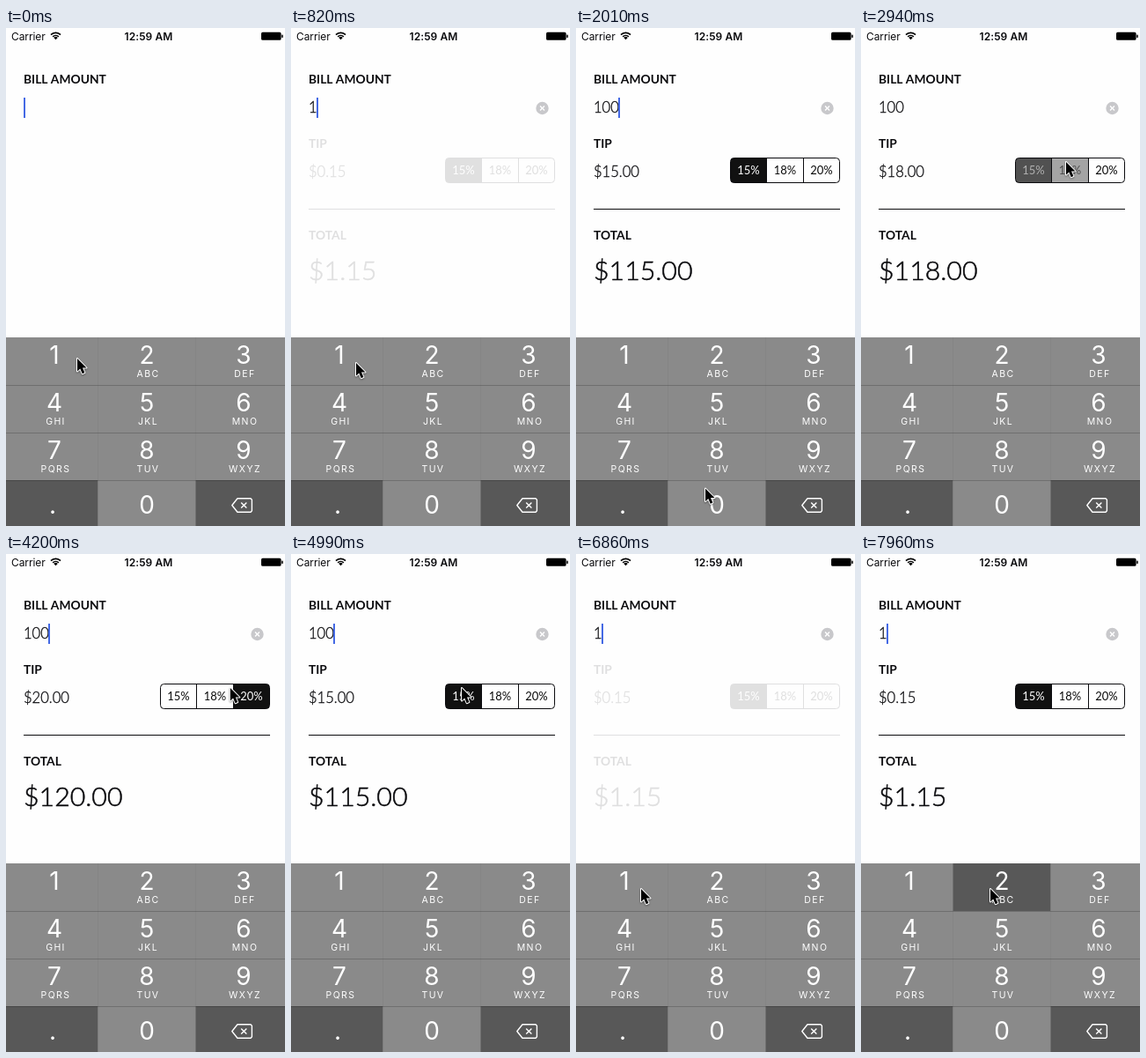
Animation, 317 px wide and 565 px high, one loop 8000 ms. Source, as an HTML page with a canvas:

```html
<!DOCTYPE html>
<html lang="en">
<head>
<meta charset="utf-8">
<title>Tip calculator</title>
<style>
html, body { margin: 0; width: 100%; height: 100%; overflow: hidden; background: #fefefe; }
canvas { display: block; width: 317px; height: 565px; }
</style>
</head>
<body>
<canvas id="stage"></canvas>
<script>
const W = 317, H = 565, LOOP = 8000;
const MOVE = 300, PRESS = 140, CROSSFADE = 300, REVEAL = 550, HIDE = 120;
const PAPER = '#fefefe', INK = '#0b0b0e';
const UI = 'Inter, sans-serif', BODY = 'Lato, sans-serif';

const canvas = document.getElementById('stage');
const ctx = canvas.getContext('2d');
const ratio = window.devicePixelRatio || 1;
canvas.width = W * ratio;
canvas.height = H * ratio;

const digits = '123456789.0'.split('');
const letters = ' ABC DEF GHI JKL MNO PQRS TUV WXYZ'.split(' ');
const percents = [15, 18, 20];
const colEdges = [0, 104.5, 215.5, W];
const colCenters = [55, 160, 270];
const rowTop = row => 351 + 54 * row;
const segX = i => 175.5 + Math.round(41.3 * i);

// Places the pointer can tap
function key(digit) {
  const i = digits.indexOf(digit);
  return { digit, x: 74 + 73 * (i % 3), y: 380 + 47.5 * Math.floor(i / 3) };
}
const segment = i => ({ segment: i, x: 194 + 39 * i, y: 152 });
const clearButton = { clear: true, x: 286, y: 92 };

// The pointer leaves for a target, then lifts off it at `taps`
const home = { x: 81, y: 375 };
const steps = [
  { target: key('1'), leaves: 300, taps: [700] },
  { target: key('0'), leaves: 980, taps: [1780, 1980] },
  { target: segment(1), leaves: 2060, taps: [2860] },
  { target: segment(2), leaves: 3090, taps: [3700] },
  { target: segment(0), leaves: 4110, taps: [4600] },
  { target: clearButton, leaves: 5040, taps: [5870] },
  { target: key('1'), leaves: 6230, taps: [6740] },
  { target: key('0'), leaves: 6940, taps: [] },
  { target: key('2'), leaves: 7600, taps: [8040] }
];
const taps = steps.flatMap(({ target, taps }) => taps.map(at => ({ ...target, at })));

const clamp = v => Math.max(0, Math.min(1, v));
const smooth = v => v * v * (3 - 2 * v);
const mix = (a, b, p) => a + (b - a) * p;
const gray = v => `rgb(${Math.round(v)},${Math.round(v)},${Math.round(v)})`;

// Replays every tap finished by time t
function stateAt(t) {
  const s = { bill: '', amount: 0, editAt: 0, toggleAt: -LOOP, rate: 0, oldRate: 0, rateAt: -LOOP };
  for (const { at, digit, segment, clear } of taps) {
    if (at > t) break;
    if (segment !== undefined) {
      s.oldRate = s.rate;
      s.rate = segment;
      s.rateAt = at;
      continue;
    }
    if (clear || !s.bill) s.toggleAt = at;
    s.bill = clear ? '' : s.bill + digit;
    s.amount = Number(s.bill) || s.amount;
    s.editAt = at;
  }
  s.pressed = taps.find(tap => t >= tap.at - PRESS && t < tap.at) || {};
  return s;
}

function text(str, x, y, font, { align = 'left', color = INK, spacing = 0, outline = 0 } = {}) {
  ctx.font = font;
  ctx.textAlign = align;
  ctx.fillStyle = ctx.strokeStyle = color;
  ctx.letterSpacing = spacing + 'px';
  ctx.fillText(str, x, y);
  if (outline) {
    ctx.lineWidth = outline;
    ctx.strokeText(str, x, y);
  }
  ctx.letterSpacing = '0px';
}

const label = (str, y) => text(str, 20, y, `700 13.8px ${BODY}`);
const value = (str, y, size) =>
  text(str, 20, y, `300 ${size}px ${BODY}`, { outline: size * 0.018 });

function line(points, color, width, close) {
  ctx.beginPath();
  points.forEach(([x, y]) => ctx.lineTo(x, y));
  if (close) ctx.closePath();
  ctx.strokeStyle = color;
  ctx.lineWidth = width;
  ctx.stroke();
}

function cross(x, y, r) {
  line([[x - r, y - r], [x + r, y + r]], '#fff', 1.4);
  line([[x - r, y + r], [x + r, y - r]], '#fff', 1.4);
}

function statusBar() {
  text('Carrier', 6, 13.5, `400 12px ${UI}`, { spacing: -0.1 });
  text('12:59 AM', 162, 13.5, `600 12px ${UI}`, { align: 'center', spacing: 0.1 });
  ctx.strokeStyle = ctx.fillStyle = '#000';
  for (let i = 0; i < 3; i++) {
    ctx.beginPath();
    ctx.arc(56.5, 13.2, 1.6 + 3.1 * i, -Math.PI * 0.75, -Math.PI * 0.25);
    ctx.lineWidth = i ? 1.7 : 3.2;
    ctx.stroke();
  }
  ctx.beginPath();
  ctx.roundRect(290, 4.8, 22.6, 9, 1.6);
  ctx.roundRect(313.2, 7.5, 1.5, 3.6, 0.7);
  ctx.fill();
}

function segmentShade(i, t, s) {
  const p = clamp((t - s.rateAt) / CROSSFADE);
  if (i === s.rate) return mix(0.15, 1, p);
  if (i === s.pressed.segment) return 0.15;
  return i === s.oldRate ? 1 - p : 0;
}

function segments(t, s) {
  ctx.save();
  ctx.beginPath();
  ctx.roundRect(175.5, 147.5, 124, 28, 4);
  ctx.clip();
  percents.forEach((pct, i) => {
    const shade = segmentShade(i, t, s);
    const x = segX(i), w = segX(i + 1) - x;
    ctx.fillStyle = gray(mix(254, 17, shade));
    ctx.fillRect(x, 147, w, 29);
    text(pct + '%', x + w / 2, 166, `400 13px ${BODY}`,
      { align: 'center', color: gray(mix(10, 255, clamp((shade - 0.15) / 0.85))) });
    if (i) line([[x, 147], [x, 176]], INK, 1);
  });
  ctx.restore();
  ctx.beginPath();
  ctx.roundRect(175.5, 147.5, 124, 28, 4);
  ctx.strokeStyle = INK;
  ctx.lineWidth = 1;
  ctx.stroke();
}

function summary(t, s) {
  const since = t - s.toggleAt;
  const shown = s.bill ? smooth(clamp(since / REVEAL)) : 1 - clamp(since / HIDE);
  if (!shown) return;
  const tip = s.amount * percents[s.rate] / 100;
  const money = v => '$' + v.toFixed(2);
  label('TIP', 136);
  value(money(tip), 168.7, 16.6);
  segments(t, s);
  line([[20, 205.5], [300, 205.5]], INK, 1);
  label('TOTAL', 240);
  value(money(s.amount + tip), 286, 30.3);

  // Veil the whole group so that it fades as one layer
  ctx.globalAlpha = 1 - shown;
  ctx.fillStyle = PAPER;
  ctx.fillRect(0, 115, W, 200);
  ctx.globalAlpha = 1;
}

function billField(t, s) {
  label('BILL AMOUNT', 63);
  value(s.bill, 95.8, 16.6);
  const caretX = Math.floor(20 + ctx.measureText(s.bill).width);
  ctx.globalAlpha = clamp((640 - (t - s.editAt) % 1000) / 60);
  ctx.fillStyle = '#4469e4';
  ctx.fillRect(caretX, 79, 2, 23);
  ctx.globalAlpha = 1;
  if (!s.bill) return;
  ctx.beginPath();
  ctx.arc(285.5, 91, 7.2, 0, Math.PI * 2);
  ctx.fillStyle = s.pressed.clear ? '#8e8e93' : '#c8c8cb';
  ctx.fill();
  cross(285.5, 91, 2.5);
}

function backspace() {
  ctx.lineJoin = 'round';
  line([[256.8, 541.5], [263, 533.8], [278, 533.8], [279.4, 535.2], [279.4, 547.8],
    [278, 549.2], [263, 549.2]], '#fff', 1.4, true);
  cross(270.3, 541.5, 3.1);
  ctx.lineJoin = 'miter';
}

function keypad(s) {
  const white = { align: 'center', color: '#fff' };
  for (let i = 0; i < 12; i++) {
    const col = i % 3, row = Math.floor(i / 3);
    const top = rowTop(row), x = colEdges[col], cx = colCenters[col];
    const digit = digits[i] || '';
    const dark = digit === '.' || !digit || digit === s.pressed.digit;
    ctx.fillStyle = dark ? '#585858' : '#8a8a8a';
    ctx.fillRect(x, top, colEdges[col + 1] - x, 54);
    text(digit, digit === '.' ? cx - 2 : cx, top + (row < 3 ? 30 : 37.5), `400 28px ${UI}`, white);
    text(letters[i] || '', cx + 1.5, top + 45, `400 10.5px ${UI}`, { ...white, spacing: 1.4 });
  }
  backspace();
  const rule = 'rgba(0,0,0,.2)';
  for (let i = 1; i < 4; i++) line([[0, rowTop(i) + 0.5], [W, rowTop(i) + 0.5]], rule, 1);
  for (let i = 1; i < 3; i++) line([[colEdges[i], rowTop(0)], [colEdges[i], H]], rule, 1);
}

function pointerAt(t) {
  return steps.reduce((from, { target, leaves }) => {
    const p = smooth(clamp((t - leaves) / MOVE));
    return { x: mix(from.x, target.x, p), y: mix(from.y, target.y, p) };
  }, home);
}

function pointer(t) {
  const { x, y } = pointerAt(t);
  ctx.save();
  ctx.translate(x, y);
  ctx.beginPath();
  [[0, 0], [0, 14.6], [3.3, 11.5], [5.7, 17.2], [8.4, 16.1], [6, 10.6], [10.5, 10.6]]
    .forEach(([px, py]) => ctx.lineTo(px, py));
  ctx.closePath();
  ctx.lineJoin = 'round';
  ctx.shadowColor = 'rgba(0,0,0,.4)';
  ctx.shadowBlur = 2 * ratio;
  ctx.shadowOffsetY = ratio;
  ctx.strokeStyle = '#fff';
  ctx.lineWidth = 2;
  ctx.stroke();
  ctx.shadowColor = 'transparent';
  ctx.fillStyle = '#000';
  ctx.fill();
  ctx.restore();
}

function draw(t) {
  const s = stateAt(t);
  ctx.setTransform(ratio, 0, 0, ratio, 0, 0);
  ctx.fillStyle = PAPER;
  ctx.fillRect(0, 0, W, H);
  statusBar();
  summary(t, s);
  billField(t, s);
  keypad(s);
  pointer(t);
}

const start = performance.now();
function tick() {
  draw((performance.now() - start) % LOOP);
  requestAnimationFrame(tick);
}
tick();
</script>
</body>
</html>
```
